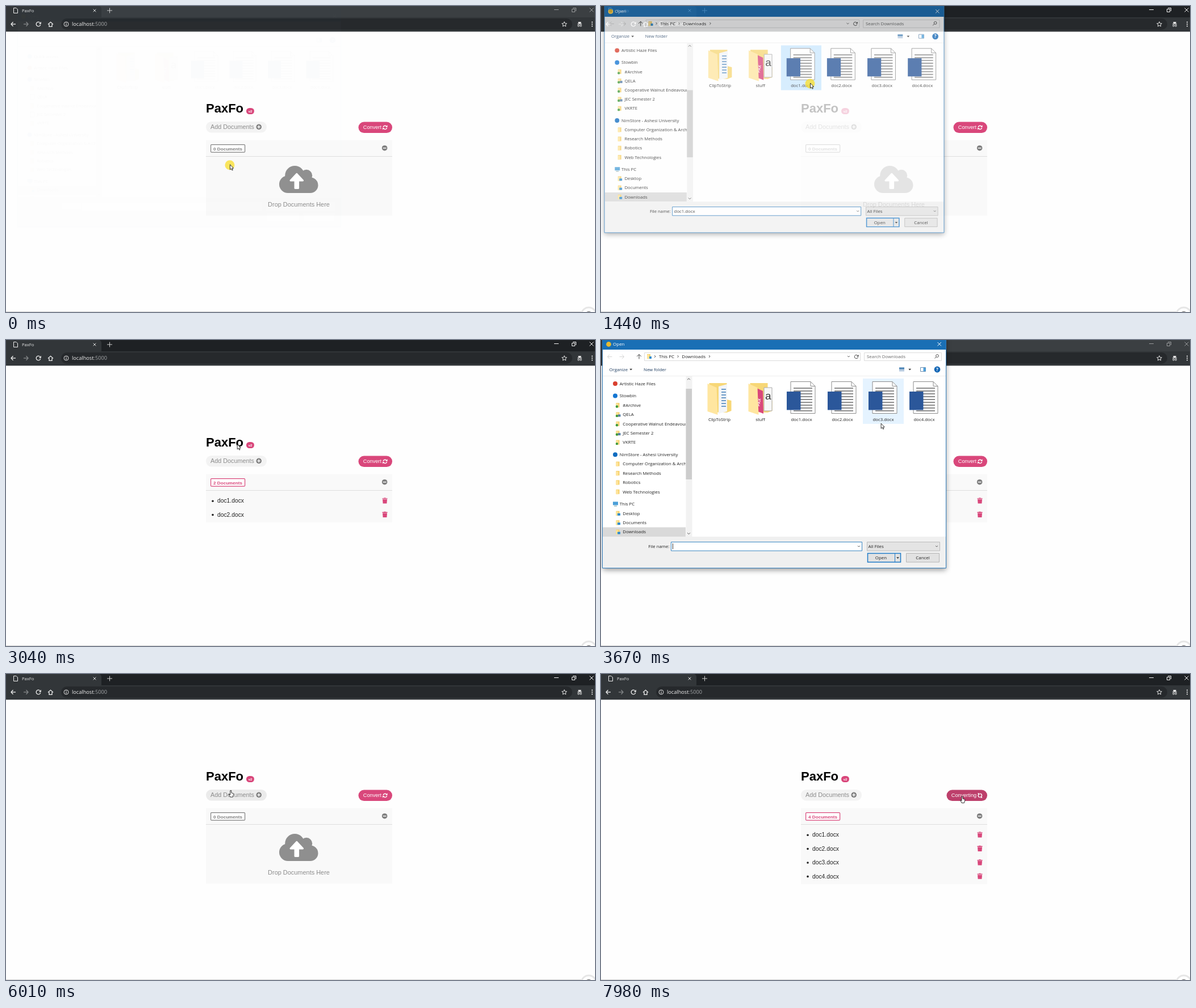
Animation, 1037 px wide and 540 px high, one loop 8000 ms. Source, as an HTML page with a canvas:

```html
<!DOCTYPE html>
<html lang="en">
<head>
<meta charset="utf-8">
<title>Document converter demo</title>
<style>
html, body { margin: 0; width: 1037px; height: 540px; overflow: hidden; background: #fefefe; }
canvas { display: block; }
</style>
</head>
<body>
<canvas id="stage" width="1037" height="540"></canvas>
<script>
const W = 1037, H = 540, LOOP = 8000, FADE = 160;
const screen2d = document.getElementById('stage').getContext('2d');
const layer = new OffscreenCanvas(W, H);
const layer2d = layer.getContext('2d');
let c = screen2d;

const UI = '"Open Sans", sans-serif', SANS = '"Liberation Sans", Arial, sans-serif';
const PINK = '#d9477b', GREY = '#8c8c8c', APP = 'PaxFo';

const spot = (x, y) => ({ x, y });
const column = n => 281 + 72 * n;
const fileSpot = (n, y = 136) => spot(column(n) + 15, y);
const START = spot(394, 280), ADD = spot(392, 205), CLEAR = spot(664, 250), CONVERT = spot(636, 216);

// Everything else in the timeline follows from these clicks
const STEPS = [
  { at: -60, spot: START, opens: true },
  { at: 1320, spot: fileSpot(1), file: 1, closes: true },
  { at: 2140, spot: ADD, opens: true },
  { at: 2640, spot: fileSpot(2), file: 2, closes: true },
  { at: 3330, spot: ADD, opens: true },
  { at: 3900, spot: fileSpot(3), file: 3 },
  { at: 4330, spot: fileSpot(4), file: 4, closes: true },
  { at: 5360, spot: CLEAR },
  { at: 6130, spot: ADD, opens: true },
  { at: 6560, spot: fileSpot(1), file: 1 },
  { at: 6950, spot: fileSpot(4, 111), file: 4, closes: true },
  { at: 7680, spot: CONVERT }
];
const timeOf = place => STEPS.find(s => s.spot === place).at;
const DIALOGS = STEPS.flatMap((step, i) => {
  if (!step.opens) return [];
  const last = STEPS.find((s, j) => j > i && s.closes);
  return { open: step.at + 60, first: STEPS[i + 1], close: last.at + 60, added: last.at + 300, total: last.file };
});

// Label, level, icon colour
const TREE = [
  ['Quick access', 0, '#2d8fe0'], ['Artistic Haze Files', 0, '#d9402f'], ['Stowbin', 0, '#1476d2'],
  ['#Archive', 1], ['QELA', 2], ['Cooperative Walnut Endeavour', 1], ['JEC Semester 2', 2], ['VKRTE', 1],
  ['NimStore - Ashesi University', 0, '#0f6cc0'], ['Computer Organization & Architecture', 1],
  ['Research Methods', 1], ['Robotics', 1], ['Web Technologies', 1], ['This PC', 0, '#4b9fd8'],
  ['Desktop', 1], ['Documents', 1], ['Downloads', 1], ['ClipToStrip', 1]
];
const SYNCED = 8;

function paint(fill, stroke) {
  if (fill) { c.fillStyle = fill; c.fill(); }
  if (stroke) { c.strokeStyle = stroke; c.stroke(); }
}
function rect(x, y, w, h, fill, stroke, r = 0) {
  c.beginPath();
  c.roundRect(x, y, w, h, r);
  paint(fill, stroke);
}
function circle(x, y, r, fill, stroke) {
  c.beginPath();
  c.arc(x, y, r, 0, 7);
  paint(fill, stroke);
}
function poly(points, fill, stroke) {
  c.beginPath();
  points.forEach(([x, y]) => c.lineTo(x, y));
  c.closePath();
  paint(fill, stroke);
}
function line(color, ...points) {
  c.beginPath();
  points.forEach(([x, y]) => c.lineTo(x, y));
  paint(null, color);
}
function text(s, x, y, size, color = '#222', font = UI, align = 'left', weight = 400) {
  c.font = `${weight} ${size}px ${font}`;
  c.textAlign = align;
  c.fillStyle = color;
  c.fillText(s, x, y + size * 0.36);
}
function at(x, y, draw, angle = 0, scale = 1) {
  c.save();
  c.translate(x, y);
  c.rotate(angle);
  c.scale(scale, scale);
  draw();
  c.restore();
}
const chevron = (x, y, color = '#666', d = 2) => line(color, [x - d, y - d / 2], [x, y + d / 2], [x + d, y - d / 2]);
const caret = (x, y) => poly([[x - 2.4, y - 1.2], [x + 2.4, y - 1.2], [x, y + 1.6]], '#333');
const arrow = (x, y, color, angle = 0) =>
  at(x, y, () => { line(color, [4, 0], [-4, 0]); line(color, [-.5, -3.8], [-4, 0], [-.5, 3.8]); }, angle);
function cross(x, y, d, color) {
  line(color, [x - d, y - d], [x + d, y + d]);
  line(color, [x - d, y + d], [x + d, y - d]);
}
function signIcon(x, y, plus) {
  circle(x, y, 4.8, '#808080');
  rect(x - 2.8, y - .7, 5.6, 1.4, '#fff');
  if (plus) rect(x - .7, y - 2.8, 1.4, 5.6, '#fff');
}
function reload(x, y, r, color) {
  c.beginPath();
  c.arc(x, y, r, .2, 5.5);
  paint(null, color);
  poly([[x + r + 1, y - r - .5], [x + r + 1, y - .3], [x + r - 3, y - .3]], color);
}

function browser(active) {
  rect(0, 0, W, 20, active ? '#1e2124' : '#3b3f42');
  rect(-8, 0, 176, 24, '#323639', null, 5);
  rect(0, 20, W, 25.5, '#323639');
  rect(97, 22, 900, 20, '#26292c', null, 10);
  c.lineWidth = 1;
  poly([[13.5, 3.5], [18, 3.5], [20.5, 6], [20.5, 12.5], [13.5, 12.5]], null, '#eee');
  text(APP, 28, 8, 7.6, '#e8e8e8');
  cross(156, 8, 2.4, '#ddd');
  at(182.5, 8, () => cross(0, 0, 3.2, '#ccc'), Math.PI / 4);

  const control = active ? '#f4f4f4' : '#97999b';
  line(control, [965, 6.5], [973, 6.5]);
  rect(996.5, 5.5, 5, 5, null, control);
  line(control, [998, 3.5], [1003.5, 3.5], [1003.5, 9]);
  cross(1031, 7, 3.5, control);

  c.lineWidth = 1.3;
  arrow(13, 32, '#f0f0f0');
  arrow(35, 32, '#85888a', Math.PI);
  reload(57, 32, 3.8, '#f0f0f0');
  line('#f0f0f0', [74, 32.5], [78.5, 28.3], [83, 32.5]);
  line('#f0f0f0', [76, 32], [76, 36.3], [81, 36.3], [81, 32]);
  c.lineWidth = 1;
  circle(106, 32, 4, null, '#ddd');
  rect(105.4, 31.5, 1.2, 3, '#ddd');
  rect(105.4, 29.5, 1.2, 1.2, '#ddd');
  text('localhost', 116, 32, 9.2, '#f2f2f2');
  text(':5000', 116 + c.measureText('localhost').width, 32, 9.2, '#a4a7a9');

  const star = Array.from({ length: 10 }, (_, i) => {
    const a = i * Math.PI / 5 - Math.PI / 2, r = i % 2 ? 2.1 : 4.6;
    return [983 + r * Math.cos(a), 32.3 + r * Math.sin(a)];
  });
  poly(star, null, '#e4e4e4');
  rect(1007.5, 28, 5, 3, '#e4e4e4');
  rect(1006, 31.3, 8, 1, '#e4e4e4');
  for (const x of [1008, 1012]) circle(x, 34.7, 1.4, null, '#e4e4e4');
  for (const dy of [-3.5, 0, 3.5]) circle(1032, 32 + dy, 1.1, '#eee');
}

function cloud() {
  at(481, 278.6, () => {
    for (const [x, y, r] of [[256, 192, 160], [448, 192, 96], [144, 336, 144], [512, 352, 128]]) circle(x, y, r, '#8f8f8f');
    rect(144, 200, 370, 280, '#8f8f8f');
    c.lineJoin = 'round';
    c.lineWidth = 26;
    poly([[288, 164], [390, 275], [186, 275]], '#fff', '#fff');
    rect(248, 270, 80, 146, '#fff', null, 14);
  }, 0, .107);
}

function syncIcon(x, y, angle) {
  for (const turn of [0, Math.PI]) at(x, y, () => {
    c.lineWidth = 1.4;
    c.beginPath();
    c.arc(0, 0, 3.2, Math.PI + .15, 2 * Math.PI - .6);
    paint(null, '#fff');
    poly([[4.3, -4.2], [4.3, -.6], [.8, -.6]], '#fff');
  }, angle + turn);
}

function trash(x, y) {
  rect(x - 4.6, y - 4.4, 9.2, 1.4, PINK, null, .5);
  rect(x - 1.6, y - 5.2, 3.2, 1.2, PINK);
  poly([[x - 4, y - 2.4], [x + 4, y - 2.4], [x + 3.4, y + 5], [x - 3.4, y + 5]], PINK);
}

function page(t, count, hoverAdd) {
  rect(0, 45.5, W, H, '#fefefe');
  text(APP, 352, 180, 22, '#000', SANS, 'left', 700);
  rect(423, 180, 14, 11, PINK, null, 5.5);
  text('v2', 430, 185.4, 6, '#fff', SANS, 'center', 700);

  rect(352, 204, 107, 19.5, hoverAdd ? '#ebebeb' : '#f3f3f3', null, 9.7);
  text('Add Documents', 360, 213.3, 10.8, GREY, SANS);
  signIcon(445.2, 213.4, true);

  const spin = t - timeOf(CONVERT) - 20, busy = spin >= 0, left = busy ? 608.5 : 620.5;
  rect(left, 204.6, 680 - left, 19.4, busy ? '#bd3f6b' : PINK, null, 9.7);
  text(busy ? 'Converting' : 'Convert', left + 8.3, 214, 9.2, '#fff', SANS);
  syncIcon(667.3, 214.4, busy ? .6 + spin / 320 : 0);

  rect(352, 237, 328, count ? 36 + 24.4 * count : 133, '#f9f9f9');
  const tone = count ? PINK : '#7f7f7f';
  c.lineWidth = 1.2;
  rect(360.6, 244.6, 60, 13.6, '#fff', tone, 1.5);
  text(`${count} Documents`, 390.5, 251.6, 8.1, tone, SANS, 'center', 700);
  signIcon(666.6, 250.7);
  rect(352, 265, 328, 1, '#dedede');

  if (!count) {
    cloud();
    text('Drop Documents Here', 515.5, 350, 10.95, GREY, SANS, 'center');
  }
  for (let i = 0; i < count; i++) {
    const y = 283.6 + 24.4 * i;
    circle(364, y + .6, 1.8, '#222');
    text(`doc${i + 1}.docx`, 372, y, 10.3, '#222', SANS);
    trash(667, y);
  }
  rect(0, 539, W, 1, '#d2d2d2');
  c.lineWidth = 3;
  circle(1026, 545, 13, '#fff', '#e6e6e6');
  circle(1026, 547, 8, '#555');
}

function smallFolder(x, y) {
  rect(x - 3, y - 4, 6, 8, '#f5cf69');
  rect(x - 3, y - 3, 4, 7.5, '#ffe49b');
}

function tree(age, loading) {
  c.save();
  c.beginPath();
  c.rect(3, 64, 146, 283);
  c.clip();
  let y = loading ? 61 : 33.8;
  TREE.forEach(([label, level, color], i) => {
    const personal = /^D/.test(label);
    if (loading && personal && label !== 'Downloads') return;
    y += level ? 16.4 : 21.6;
    if (label === 'Downloads') rect(3, y - 8, 146, 16.4, '#d9d9d9');
    if (label === 'This PC') {
      rect(21, y - 4, 9, 6, color);
      rect(23, y + 3, 5, 1.2, '#8aa');
    } else if (!level) circle(25, y, 4, color);
    else if (loading && level === 2) rect(26.5, y - 4.5, 7, 9, '#fff', '#999');
    else {
      smallFolder(29.5, y);
      if (i < SYNCED && !loading) circle(28, y + 2.5, 2.2, '#3c9a3c');
      if (level === 2) rect(30, y, 4.5, 4, '#567fa8');
      if (personal) rect(29, y, 5, 4, '#2f8cd0');
    }
    text(label, level ? 38.3 : 32.8, y, 7.8);
  });
  c.restore();
  rect(149.5, 64, 11, 283, '#f2f2f2');
  rect(149.5, loading ? 75 : age < 500 ? 86 : 148, 10.5, loading ? 221 : 160 * (age < 500) || 120, '#cdcdcd');
  chevron(154.5, 69, '#555', -2.4);
  chevron(154.5, 341.5, '#555', 2.4);
}

function bigFolder(x, name, inside) {
  poly([[x - 18, 76], [x + 13, 76], [x + 13, 105], [x + 21, 107], [x + 21, 125], [x + 13, 128], [x - 18, 127]], '#f7d777');
  inside();
  poly([[x - 21, 77], [x - 5, 84], [x - 3, 132], [x - 21, 126]], '#ffe6a0');
  text(name, x, 140, 7.8, '#222', UI, 'center');
}

function docFile(x, name, fill) {
  if (fill) rect(x - 36, 68, 72, 80, fill);
  c.lineWidth = 1;
  poly([[x - 19, 73.5], [x + 16, 73.5], [x + 24, 81.5], [x + 24, 129.5], [x - 19, 129.5]], '#fff', '#8b8b8b');
  line('#8b8b8b', [x + 16, 73.5], [x + 16, 81.5], [x + 24, 81.5]);
  for (let y = 84; y < 126; y += 5) rect(x - 14, y, 33, 2, '#8e8e8e');
  rect(x - 26, 91, 24.5, 32.5, '#2b579a');
  text(name, x, 140, 7.8, '#222', UI, 'center');
}

function dialogFrame() {
  c.lineWidth = 1;
  c.shadowColor = '#0006';
  c.shadowBlur = 9;
  c.shadowOffsetY = 3;
  rect(2.5, -8, 605, 410.5, '#fff');
  c.shadowColor = 'transparent';
  rect(3, 63, 604, 1, '#eee');
  rect(3, 347, 604, 55, '#f0f0f0');
  rect(2.5, -8, 605, 25, '#1a6fb5');
  rect(2.5, -8, 605, 410.5, null, '#2f7bbb');
  circle(13.5, 7.5, 4.4, '#e8b92f');
  text('Open', 21, 7.5, 8, '#fff');
  cross(595.7, 7.2, 3.2, '#fff');
  rect(562.5, 48.5, 9, 7, '#fff', '#6b8fb0');
  rect(567.5, 49, 4, 6, '#4da0dc');
  circle(592, 52, 5.4, '#1467b5');
  text('?', 592, 52, 8, '#fff', UI, 'center', 700);
}

function toolbar() {
  arrow(15.5, 29.5, '#d6d6d6');
  arrow(36.5, 29.5, '#d6d6d6', Math.PI);
  arrow(67, 29.5, '#444', Math.PI / 2);
  rect(76.5, 22.5, 380, 14, '#fff', '#dcdcdc');
  smallFolder(84, 29);
  rect(85, 29, 4, 4, '#2f8cd0');
  for (const x of [95, 135.5, 191]) at(x, 29, () => chevron(0, 0, '#555'), -Math.PI / 2);
  text('This PC', 102, 29, 8);
  text('Downloads', 142.3, 29, 8);
  chevron(436, 29);
  reload(449.5, 29.5, 3.2, '#555');
  rect(463.5, 22.5, 136, 14, '#fff', '#dcdcdc');
  text('Search Downloads', 468, 29.3, 7.9, '#666');
  circle(592, 28, 2.4, null, '#555');
  line('#555', [590, 30], [587.5, 32.5]);
  text('Organize', 14.5, 52, 7.8, '#1d3b5f');
  text('New folder', 75, 52, 7.8, '#1d3b5f');
  caret(52.7, 52);
  caret(543.7, 52);
  rect(525, 48.5, 9, 7, '#b8cbe0');
  rect(525, 48.5, 9, 3, '#4b84b5');
}

function files(picked, mouse) {
  bigFolder(208.5, 'ClipToStrip', () => {
    poly([[207, 82], [222, 78], [222, 126], [207, 130]], '#f3f5f8');
    for (let y = 86; y < 120; y += 5) rect(212, y, 8, 2, '#6d9bc8');
  });
  bigFolder(280.5, 'stuff', () => {
    rect(287, 84, 14, 41, '#f7f7f7', '#aaa');
    text('a', 289, 98, 19, '#333', SANS);
    poly([[270, 83], [285, 90], [286, 130], [271, 124]], PINK);
    at(278, 110, () => text('PAX', 0, 0, 7, '#fff', SANS, 'center', 700), -1.4);
  });
  for (let n = 1; n <= 4; n++) {
    const over = Math.abs(mouse.x - column(n)) < 36 && Math.abs(mouse.y - 108) < 40;
    docFile(column(n), `doc${n}.docx`, picked.includes(n) ? '#cce8ff' : over && '#e5f3ff');
  }
}

function form(picked, loading) {
  const box = (x, y, w, fill, stroke) => rect(x, y, w, 15.5, loading ? '#fff' : fill, loading ? '#fff' : stroke);
  box(123.5, 356.5, 336, '#fff', '#3a86c2');
  box(468.5, 356.5, 128, '#e4e4e4', '#bbb');
  box(537.5, 376.5, 58, '#e2e2e2', '#b5b5b5');
  c.lineWidth = 1.5;
  box(469.5, 376.5, 58, '#e2e2e2', '#1f7bc8');
  c.lineWidth = 1;
  if (loading) return rect(84, 358, 37, 11, '#fff');

  const names = picked.map(n => `doc${n}.docx`);
  text('File name:', 120.5, 364, 7.8, '#222', UI, 'right');
  text(names.length > 1 ? names.map(n => `"${n}"`).join(' ') : names.join(''), 126.5, 364, 7.9);
  if (!names.length) rect(126, 359, .9, 10, '#222');
  chevron(454, 364);
  text('All Files', 470.5, 364, 7.9);
  chevron(591, 364);
  text('Open', 493, 384.5, 7.9, '#222', UI, 'center');
  line('#1f7bc8', [517.5, 376.5], [517.5, 392]);
  caret(522.5, 384.5);
  text('Cancel', 566.5, 384.5, 7.9, '#222', UI, 'center');
}

function dialog(d, t, mouse) {
  const age = t - d.open, loading = age < 180;
  const picked = [1, 2, 3, 4].filter(n => t >= d.first.at && n >= d.first.file && mouse.x > column(n) - 36);
  dialogFrame();
  if (!loading) toolbar();
  tree(age, loading);
  files(picked, mouse);
  form(picked, loading);
}

function showDialog(d, t, mouse) {
  const missing = (1 - Math.min(1, (t - d.open) / 200)) ** 2;
  const gone = Math.max(0, (t - d.close) / FADE) ** 1.5;
  c = layer2d;
  c.clearRect(0, 0, W, H);
  at(305, 190, () => {
    c.translate(-305, -190);
    dialog(d, t, mouse);
  }, 0, 1 - .06 * missing - .05 * gone);
  c = screen2d;
  c.globalAlpha = (1 - missing) * (1 - gone);
  c.drawImage(layer, 0, 0);
  c.globalAlpha = 1;
}

function mouseAt(t) {
  const i = STEPS.findIndex(s => s.at > t);
  if (i < 0) return STEPS.at(-1).spot;
  const from = STEPS[i - 1], to = STEPS[i];
  const start = from.at + (from.closes ? 200 : 60), end = to.at - 40;
  const p = Math.min(1, Math.max(0, (t - start) / (end - start)));
  const k = 1 - (1 - p) ** 2;
  return spot(from.spot.x + (to.spot.x - from.spot.x) * k, from.spot.y + (to.spot.y - from.spot.y) * k);
}

function pointer({ x, y }, hand) {
  at(x, y, () => {
    c.lineWidth = .9;
    c.lineJoin = 'round';
    if (hand) poly([[-1, 0], [1, 0], [1, 4], [5, 5.5], [3.5, 11.5], [-1, 11.5], [-3.5, 6.5], [-1, 7.5]], '#fff', '#222');
    else poly([[.5, 0], [.5, 9], [2.6, 7.2], [4, 10.2], [5.4, 9.6], [4.1, 6.7], [6.6, 6.5]], '#fff', '#222');
  });
}

function countAt(t) {
  const changes = DIALOGS.map(d => [d.added, d.total]);
  changes.push([timeOf(CLEAR) + 60, 0]);
  changes.sort((a, b) => a[0] - b[0]);
  return changes.filter(([time]) => t >= time).pop()?.[1] ?? 0;
}

function draw(t) {
  const mouse = mouseAt(t);
  const current = DIALOGS.find(d => t >= d.open && t < d.close + FADE);
  const blocked = current && t < current.close + 30;
  const near = (x, y, w, h) => !current && Math.abs(mouse.x - x) < w && Math.abs(mouse.y - y) < h;
  const overAdd = near(405, 214, 54, 10);
  browser(!blocked);
  page(t, countAt(t), overAdd);
  if (current) showDialog(current, t, mouse);
  if (STEPS.some(s => t >= s.at && t < s.at + 130)) circle(mouse.x, mouse.y + 1, 8.5, 'rgba(250,222,40,.75)');
  pointer(mouse, overAdd || near(650, 214, 30, 10) || near(666, 251, 7, 7));
}

function tick(now) {
  draw(now % LOOP);
  requestAnimationFrame(tick);
}
requestAnimationFrame(tick);
</script>
</body>
</html>
```
